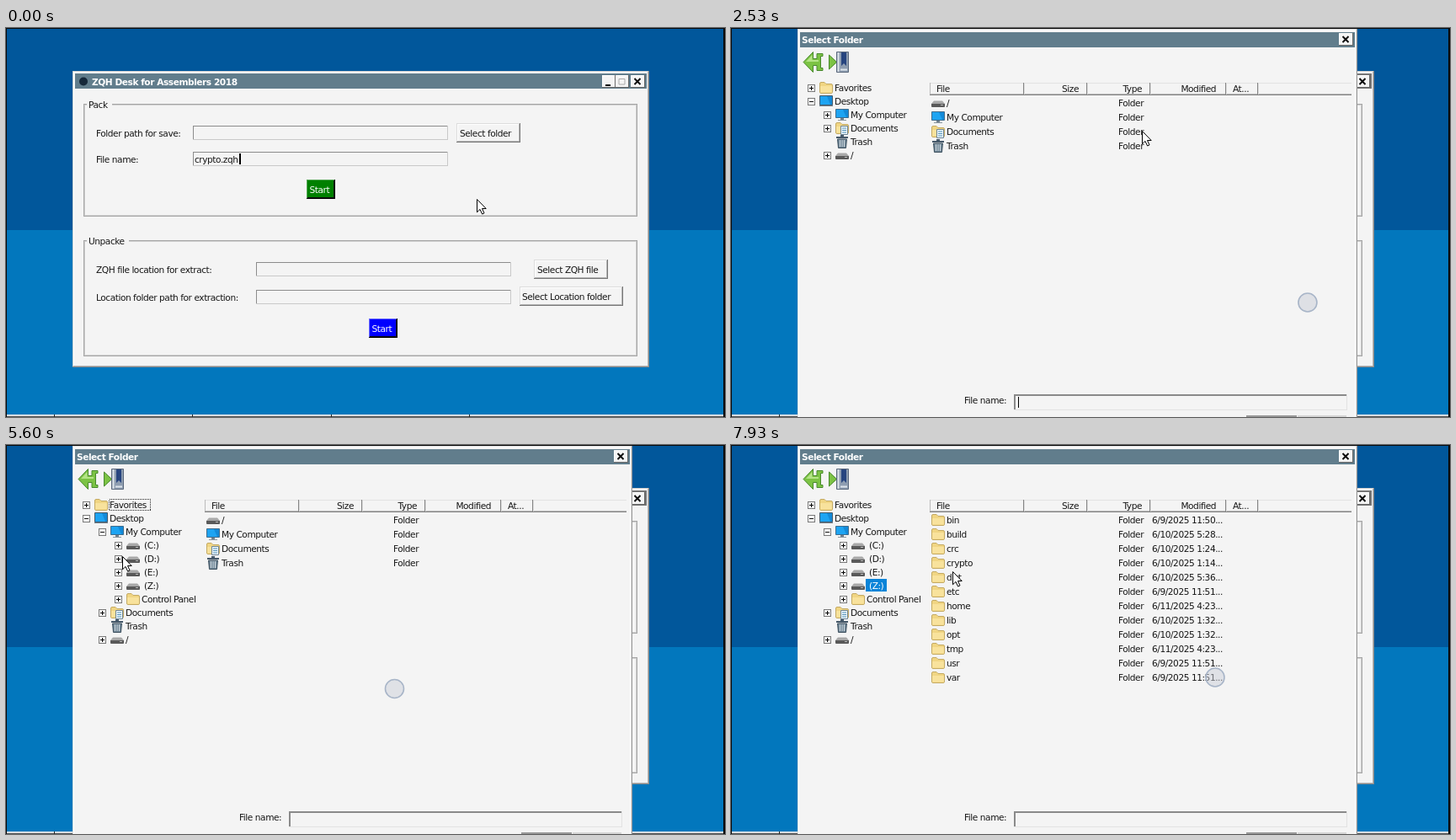
These frames come from a looping animation (854x462 px, 8 s). An HTML page:

```html
<!DOCTYPE html>
<html lang="en">
<head>
<meta charset="utf-8">
<title>Folder picker</title>
<style>
html, body { margin: 0; width: 100%; height: 100%; overflow: hidden; background: #0277bd; }
svg { display: block; width: 100vw; height: 100vh; }
text { font: 10.6px "DejaVu Sans", sans-serif; letter-spacing: -.45px; fill: #161616; white-space: pre; }
.bold { font-weight: 700; fill: #fff; }
.white { fill: #fff; }
.end { text-anchor: end; }
rect { shape-rendering: crispEdges; }
</style>
</head>
<body>
<svg id="stage" viewBox="0 0 854 462" xmlns="http://www.w3.org/2000/svg"></svg>
<script>
const FACE = '#f4f4f4', BAR = '#617d8c', LOOP = 8000, STEP = 1000 / 15;

// ---------- drawing helpers ----------
const box = (x, y, w, h, fill) => `<rect x="${x}" y="${y}" width="${w}" height="${h}" fill="${fill}"/>`;
const path = (d, fill, stroke = 'none', w = 1) =>
  `<path d="${d}" fill="${fill}" stroke="${stroke}" stroke-width="${w}"/>`;
const text = (x, y, s, cls = '') => `<text x="${x}" y="${y}" class="${cls}">${s}</text>`;
const group = (id, body) => `<g id="${id}">${body}</g>`;
const at = (x, y, body) => `<g transform="translate(${x} ${y})">${body}</g>`;
const bevel = (x, y, w, h, fill, light, dark) =>
  box(x, y, w, h, dark) + box(x, y, w - 1, h - 1, light) + box(x + 1, y + 1, w - 2, h - 2, fill);

const field = (x, y, w, h) => bevel(x, y, w, h, FACE, '#8c8c8c', '#c9c9c9');
const button = (x, y, w, h, label, tx) =>
  bevel(x, y, w, h, FACE, '#dcdcdc', '#777') +
  bevel(x + 1, y + 1, w - 2, h - 2, FACE, '#fff', '#b4b4b4') + text(tx, y + 16, label);
const startButton = (x, y, fill, light) =>
  bevel(x, y, 34, 23, fill, light, '#000') +
  bevel(x + 1, y + 1, 32, 21, fill, fill, '#111') + text(x + 3.5, y + 15.7, 'Start', 'white');
const fieldset = (x, y, w, h, label, gap) =>
  box(x, y, w, h, '#a6a6a6') + box(x + 1, y + 1, w - 2, h - 2, '#cfcfcf') +
  box(x + 2, y + 2, w - 4, h - 4, FACE) +
  box(x + 4, y - 2, gap, 5, FACE) + text(x + 6, y + 4.5, label);
const capButton = (x, y, w, glyph) => bevel(x, y, w, 15, FACE, '#fff', '#666') + at(x, y, glyph);
const cross = path('M4.5 4L11.5 11M11.5 4L4.5 11', 'none', '#000', 1.9);

// ---------- 16 px icons ----------
const icons = {
  folder: path('M.5 3Q.5 1.5 2 1.5H6L8 3.5H14Q15.5 3.5 15.5 5V13Q15.5 14.5 14 14.5H2Q.5 14.5 .5 13Z', '#f0d583', '#c4aa63') +
    path('M1 6H15V13.5H1Z', '#f8e29c'),
  desktop: path('M.5 1.5H15.5V12.5H.5Z', '#1ea4f2', '#42596a') +
    path('M9 2H15V12H13Z', '#148ad8') + box(0, 13, 16, 1, '#73818c'),
  computer: path('M.5 1.5H15.5V11.5H.5Z', '#1ea4f2', '#3f6c8c') +
    path('M9 2H15V11H13Z', '#148ad8') + box(6, 12, 4, 2, '#71808c') + box(3, 14, 10, 1, '#8b969e'),
  drive: path('M3 5.5H13L16 9H0Z', '#a9a9a9') + path('M0 9H16V12Q16 13 15 13H1Q0 13 0 12Z', '#595959') +
    box(11, 10, 3, 1, '#bbb'),
  trash: path('M2.5 5H13.5L12.5 15.5H3.5Z', '#718797', '#3e515f') + box(1, 2, 14, 2, '#46596a') +
    box(6, 0, 4, 2, '#46596a') + path('M5.5 6V14M8 6V14M10.5 6V14', 'none', '#d2dce2'),
};
icons.documents = icons.folder + path('M6.5 5.5H14.5V15.5H6.5Z', '#eef6fb', '#6d8494') +
  path('M8 8H13M8 10.5H13M8 13H13', 'none', '#4f91b8');

// ---------- tree and list ----------
const sign = (x, y, open) =>
  bevel(x, y, 9, 9, '#fff', '#777', '#777') + box(x + 2, y + 4, 5, 1, '#000') +
  (open ? '' : box(x + 4, y + 2, 1, 5, '#000'));

function treeRow([level, icon, label, mark, tx], i) {
  const y = 71 + i * 16, x = 105 + level * 19;
  return (mark ? sign(x - 14, y - 4, mark === '-') : '') + at(x, y - 8, icons[icon]) +
    text(tx || x + 18, y + 4, label);
}
const head = [[0, 'folder', 'Favorites', '+'], [0, 'desktop', 'Desktop', '-']];
const tail = [[1, 'documents', 'Documents', '+'], [1, 'trash', 'Trash'], [1, 'drive', '/', '+']];
const drives = ['(C:)', '(D:)', '(E:)', '(Z:)'].map(s => [2, 'drive', s, '+', 164]);
const treeShort = [...head, [1, 'computer', 'My Computer', '+'], ...tail];
const treeLong = [...head, [1, 'computer', 'My Computer', '-'], ...drives,
  [2, 'folder', 'Control Panel', '+'], ...tail];

function listRow([icon, name, date], i) {
  const y = 89 + i * 17;
  return at(238, y - 8, icons[icon]) + text(256, y + 4, name) + text(460, y + 4, 'Folder') +
    (date ? text(500, y + 4, date + '...') : '');
}
const rootList = [['drive', '/'], ['computer', 'My Computer'], ['documents', 'Documents'], ['trash', 'Trash']];
const dirList = [
  'bin 9 11:50', 'build 10 5:28', 'crc 10 1:24', 'crypto 10 1:14', 'dist 10 5:36', 'etc 9 11:51',
  'home 11 4:23', 'lib 10 1:32', 'opt 10 1:32', 'tmp 11 4:23', 'usr 9 11:51', 'var 9 11:51',
].map(s => {
  const [name, day, time] = s.split(' ');
  return ['folder', name, `6/${day}/2025 ${time}`];
});

const header = box(236, 65, 501, 1, '#e2e2e2') + box(236, 65, 1, 14, '#bbb') +
  box(236, 78, 501, 1, '#b5b5b5') + box(236, 79, 501, 1, '#858585') +
  [347, 422, 497, 587, 625].map(x => box(x, 65, 1, 14, '#858585') + box(x + 1, 65, 1, 14, '#ddd')).join('') +
  text(244, 76, 'File') + text(413, 76, 'Size', 'end') + text(488, 76, 'Type', 'end') +
  text(576, 76, 'Modified', 'end') + text(596, 76, 'At...');

// ---------- scene ----------
const desktop = box(0, 0, 854, 240, '#01579b') + box(0, 240, 854, 222, '#0277bd') +
  box(0, 459, 854, 3, '#d9dfe4') + box(0, 461, 854, 1, '#555') +
  [57, 221, 386, 550].map(x => box(x, 459, 1, 3, '#222')).join('');

const mainWindow = bevel(79, 51, 685, 352, FACE, '#d2d2d2', '#8a8a8a') +
  bevel(80, 52, 683, 350, FACE, '#fff', '#b4b4b4') +
  group('barOn', box(82, 54, 679, 18, BAR) + '<circle cx="92" cy="63.5" r="5" fill="#16283a"/>' +
    text(102, 68, 'ZQH Desk for Assemblers 2018', 'bold')) +
  group('barOff', box(82, 54, 679, 18, '#757575')) +
  group('caps', capButton(708, 56, 16, box(4, 11, 6, 2, '#000')) +
    capButton(724, 56, 16, path('M4 4.5H11V11H4Z', 'none', '#aaa')) + capButton(742, 56, 17, cross)) +
  fieldset(92, 90, 658, 134, 'Pack', 30) + fieldset(92, 252, 658, 138, 'Unpacke', 50) +
  text(107, 129, 'Folder path for save:') + text(107, 160, 'File name:') +
  field(222, 116, 303, 17) + field(222, 147, 303, 17) + text(224, 160, 'crypto.zqh') +
  group('caret', box(277, 149, 2, 13, '#000')) +
  button(535, 113, 76, 23, 'Select folder', 539) + startButton(357, 180, '#008000', '#55a855') +
  text(107, 290.5, 'ZQH file location for extract:') + text(107, 323.5, 'Location folder path for extraction:') +
  field(297, 278, 303, 17) + field(297, 311, 303, 17) +
  button(627, 275, 88, 23, 'Select ZQH file', 631) + button(610, 307, 123, 23, 'Select Location folder', 613) +
  startButton(431, 345, '#0000ff', '#6d6dff');

const toolbar =
  path('M86 40.5L97.5 28.5V36.5H102V30.5H109V33.5H106.5V47.5H109V50.5H102V44.5H97.5V52.5Z', '#7cc344', '#47892c') +
  path('M89 40L96.5 32V38H104V40Z', '#b4e487') +
  path('M116.5 32L125.5 40.5L116.5 49Z', '#7cc344', '#47892c') +
  path('M125.5 28.5H139.5V52.5H125.5Z', '#8e9db0', '#5b697c') +
  path('M127.5 29V52', 'none', '#dfe5ea', 2) + path('M131 29H137V45L134 42L131 45Z', '#27457f') +
  path('M130 49.5H138', 'none', '#dde4ea', 2);

const dialog = box(79, 1, 665, 461, '#9a9a9a') + box(79, 1, 664, 461, '#dedede') + box(80, 2, 662, 460, '#fff') +
  box(81, 3, 660, 459, FACE) + box(82, 5, 659, 18, BAR) + text(84, 18, 'Select Folder', 'bold') +
  capButton(722, 6, 17, cross) + toolbar +
  group('treeShort', treeShort.map(treeRow).join('')) +
  group('treeLong', treeLong.map(treeRow).join('')) +
  group('focus', '<rect x="122.5" y="64.5" width="49" height="13" fill="none" stroke="#222" stroke-dasharray="1 1"/>') +
  group('picked', box(160, 159, 25, 15, '#0a84d8') + text(164, 171, '(Z:)', 'white')) +
  group('underline', box(164, 172, 18, 1, '#fff')) +
  group('header', header) +
  group('rootList', rootList.map(listRow).join('')) +
  group('dirList', dirList.map(listRow).join('')) +
  text(277, 446, 'File name:') + box(336, 435, 396, 19, '#e2e2e2') + box(336, 435, 395, 18, '#8a8a8a') +
  box(338, 437, 393, 16, FACE) + group('nameCaret', box(341, 438, 1, 13, '#000')) +
  box(612, 460, 60, 2, '#999') + box(673, 460, 58, 2, '#d5d5d5');

const arrow = path('M.5 .5V15.8L4 12.4L6.6 18L9 16.9L6.5 11.5H11.2Z', '#fff', '#000');
const hand = path('M4.5 10V1.8Q4.5 .5 5.7 .5T7 1.8V6.5Q9.5 5.6 9.7 7Q12 6.3 12.3 7.8Q15 7.3 15 9.5V13' +
  'Q15 15 13.5 16.5V18.5H6V16.5L1 11Q.3 9.5 1.6 9Q3 8.8 4.5 10Z', '#fff', '#000') +
  path('M7 6.5V10M9.7 7V10M12.3 7.8V10.5', 'none', '#000');

const stage = document.getElementById('stage');
stage.innerHTML = desktop + mainWindow + group('dialog', dialog) +
  group('touch', '<circle r="11" fill="#c9ced8" fill-opacity=".5" stroke="#a8b5c8" stroke-width="1.6"/>') +
  group('pointer', group('arrow', arrow) + group('hand', hand)) +
  box(0, 0, 854, 1, '#0a0a0a') + box(0, 0, 1, 462, '#0a0a0a') + box(852, 0, 2, 462, '#0a0a0a');

// ---------- motion ----------
const pointerPath = [ // time, x, y
  [0, 559, 203], [200, 559, 203], [1000, 380, 188], [1067, 380, 188], [1533, 568, 119], [2267, 568, 119],
  [2533, 488, 122], [2667, 450, 119], [2733, 450, 119], [3400, 207, 101], [3533, 141, 97], [3600, 141, 98],
  [4400, 109, 101], [5267, 109, 101], [6000, 172, 170], [7000, 172, 170], [7800, 214, 150], [7933, 263, 150],
];
const touches = [ // each: time, x, y, opacity
  [[200, 800, 344, 1], [933, 620, 331, 1], [1000, 612, 331, 0]],
  [[1067, 612, 331, 1], [1467, 773, 272, 1], [1533, 800, 262, 0]],
  [[2267, 772, 323, 1], [2533, 685, 326, 1], [2667, 647, 324, 0]],
  [[2733, 647, 324, 1], [3400, 443, 302, 1], [3533, 416, 296, 0]],
  [[3600, 416, 290, 1], [4267, 397, 282, 1], [4400, 395, 280, 0]],
  [[4600, 395, 280, 1], [4733, 395, 280, .6], [4867, 395, 280, 0]],
  [[5267, 433, 257, 1], [5933, 490, 322, 1], [6000, 496, 328, 0]],
  [[6133, 496, 329, 1], [6267, 496, 329, 0]],
  [[7000, 484, 306, 1], [7800, 526, 282, 1], [7933, 575, 276, 1]],
];
const visible = { // from, to pairs
  caret: [0, 600], barOn: [0, 1860], barOff: [1860, LOOP], caps: [0, 1860, 2060, LOOP], dialog: [2060, LOOP],
  nameCaret: [2060, 2800, 3330, 3860, 4260, 4660],
  treeShort: [0, 4930], treeLong: [4930, LOOP], focus: [4930, 6730],
  picked: [6460, LOOP], underline: [6460, 7060],
  header: [0, 6460, 6730, LOOP], rootList: [0, 6460], dirList: [6730, LOOP],
  arrow: [0, 5930, 7060, LOOP], hand: [5930, 7060],
};

const el = id => document.getElementById(id);
const within = (t, spans) => spans.some((from, i) => i % 2 === 0 && t >= from && t < spans[i + 1]);

function sample(keys, t) {
  const i = keys.findIndex(k => k[0] > t);
  if (i < 0) return keys[keys.length - 1].slice(1);
  if (i === 0) return keys[0].slice(1);
  const a = keys[i - 1], b = keys[i], k = (t - a[0]) / (b[0] - a[0]);
  return a.slice(1).map((v, n) => v + (b[n + 1] - v) * k);
}

function draw(time) {
  const t = Math.floor((time % LOOP + 4) / STEP) * STEP;
  for (const id in visible) el(id).style.display = within(t, visible[id]) ? '' : 'none';
  const [x, y] = sample(pointerPath, t);
  el('pointer').setAttribute('transform', `translate(${Math.round(x)} ${Math.round(y)})`);
  const keys = touches.find(k => t >= k[0][0] - 2 && t < k[k.length - 1][0] + 2);
  const [tx, ty, alpha] = keys ? sample(keys, t) : [0, 0, 0];
  el('touch').setAttribute('transform', `translate(${tx} ${ty})`);
  el('touch').setAttribute('opacity', alpha);
}

const begin = performance.now();
function tick() {
  draw(performance.now() - begin);
  requestAnimationFrame(tick);
}
tick();
</script>
</body>
</html>
```
